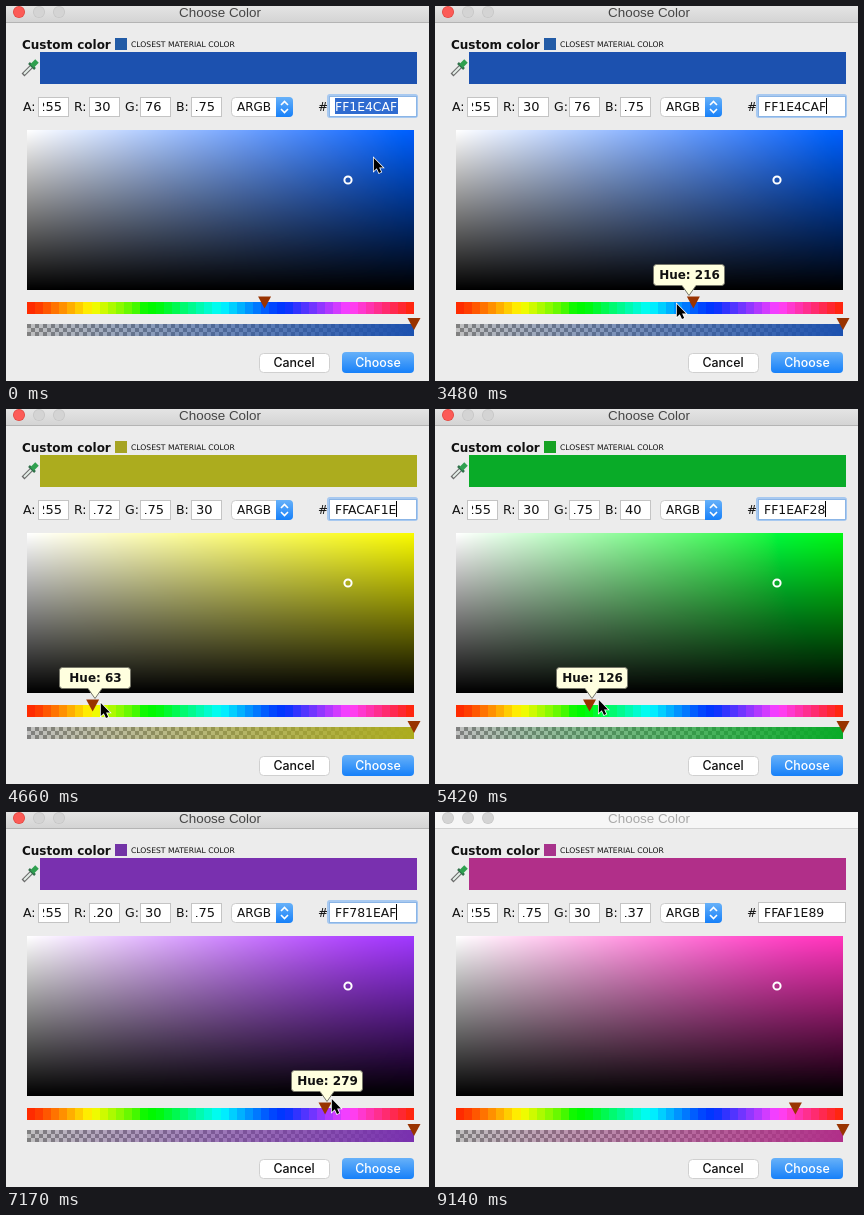
Recreate the animation shown at these times as an HTML page with a canvas. Size 423 by 375 pixels, loop 9240 ms.

```html
<!DOCTYPE html>
<html>
<head>
<meta charset="utf-8">
<style>
html, body { margin: 0; width: 423px; height: 375px; overflow: hidden; background: #ececec; }
canvas { display: block; }
</style>
</head>
<body>
<canvas id="stage" width="423" height="375"></canvas>
<script>
const ctx = document.getElementById('stage').getContext('2d');
const LOOP = 9240, DRAG = 3480, EXIT = 7960, BLUR = 9140;
const BAR_X = 21, BAR_W = 387, FIELD_H = 160;
const SANS = '"DejaVu Sans", sans-serif';

// Key points: [time, value...]
const hueStops = [[DRAG, 221], [3890, 139.9], [4600, 56], [5420, 124.1], [6280, 213.1], [7170, 277.2], [7760, 315.7]];
const approach = [[0, 367, 151], [540, 343, 169], [960, 343, 167], [1380, 410, 310], [1900, 268, 289], [3400, 259, 293]];
const leave = [[EXIT, 360, 286], [8300, 385, 355], [8560, 385, 355], [8720, 385, 376]];

const clamp = (x, lo, hi) => Math.min(hi, Math.max(lo, x));

function track(stops, t, i = 1) {
  const k = stops.findIndex(s => s[0] >= t);
  if (k === 0) return stops[0][i];
  if (k < 0) return stops[stops.length - 1][i];
  const a = stops[k - 1], b = stops[k];
  return a[i] + (b[i] - a[i]) * (t - a[0]) / (b[0] - a[0]);
}

const hueAt = t => track(hueStops, t);
const hueX = hue => BAR_X + BAR_W * hue / 360;

// While dragging, the pointer runs slightly ahead of the picked hue
function pointerAt(t) {
  if (t > 3400 && t < EXIT) return [hueX(hueAt(t + 80)), clamp(297 - (t - 3890) / 220, 286, 297)];
  const stops = t < EXIT ? approach : leave;
  return [track(stops, t, 1), track(stops, t, 2)];
}

// Display colour profile: linear light, channel mix, back to sRGB
const toLinear = Array.from({ length: 256 }, (_, i) => {
  const c = i / 255;
  return c <= 0.04045 ? c / 12.92 : ((c + 0.055) / 1.055) ** 2.4;
});
const toByte = Array.from({ length: 4097 }, (_, i) => {
  const c = i / 4096;
  return Math.round(255 * (c <= 0.0031308 ? c * 12.92 : 1.055 * c ** (1 / 2.4) - 0.055));
});
const encode = c => toByte[Math.round(clamp(c, 0, 1) * 4096)];

function shown(r, g, b) {
  const R = toLinear[r], G = toLinear[g], B = toLinear[b];
  return [encode(1.025 * R - 0.025 * G), encode(0.0194 * R + 0.9475 * G + 0.0331 * B), encode(B)];
}
const css = rgb => `rgb(${shown(...rgb)})`;

function hsv(h, s, v) {
  return [5, 3, 1].map(n => {
    const k = (n + h / 60) % 6;
    return Math.round(255 * v * (1 - s * clamp(Math.min(k, 4 - k), 0, 1)));
  });
}

function rect(x, y, w, h, fill) {
  ctx.fillStyle = fill;
  ctx.fillRect(x, y, w, h);
}

function text(str, x, y, font, fill = '#111', align = 'left') {
  ctx.font = font;
  ctx.fillStyle = fill;
  ctx.textAlign = align;
  ctx.fillText(str, x, y);
}

function path(points) {
  ctx.beginPath();
  points.forEach(p => ctx.lineTo(...p));
}

function stroke(color, width) {
  ctx.strokeStyle = color;
  ctx.lineWidth = width;
  ctx.stroke();
}

function line(points, color, width) {
  path(points);
  stroke(color, width);
}

function fill(color) {
  ctx.fillStyle = color;
  ctx.fill();
}

function disc(x, y, r, color) {
  ctx.beginPath();
  ctx.arc(x, y, r, 0, 7);
  fill(color);
}

function round(x, y, w, h, radius, color, border) {
  ctx.beginPath();
  ctx.roundRect(x, y, w, h, radius);
  fill(color);
  if (border) stroke(border, 1);
}

function fade(y0, y1, top, bottom) {
  const g = ctx.createLinearGradient(0, y0, 0, y1);
  g.addColorStop(0, top);
  g.addColorStop(1, bottom);
  return g;
}
const blueFade = (y0, y1) => fade(y0, y1, '#67b1f9', '#1680f9');

function titleBar(active) {
  rect(0, 0, 423, 16, active ? fade(0, 16, '#e4e4e4', '#d4d4d4') : '#f6f6f6');
  rect(0, 16, 423, 1, active ? '#b4b4b4' : '#d1d1d1');
  for (let i = 0; i < 3; i++) {
    const red = active && !i;
    disc(13 + 20 * i, 6, 6, red ? '#e2463f' : '#c6c6c6');
    disc(13 + 20 * i, 6, 5.2, red ? '#fc5b57' : '#d4d4d4');
  }
  text('Choose Color', 214, 11, '13.4px "Liberation Sans", sans-serif', active ? '#454545' : '#a8a8a8', 'center');
}

function dropper() {
  line([[17, 69], [26, 60]], '#6b6b6b', 4);
  line([[18, 68], [26, 60]], '#e4eee8', 2);
  line([[23, 57], [29, 63]], '#30704a', 2.5);
  line([[26, 60], [31, 55]], '#2fa04f', 5);
}

function channel(label, x, value) {
  text(label + ':', x - 16, 105, '12.5px ' + SANS);
  rect(x - 1, 91, 31, 20, '#c4c4c4');
  rect(x, 92, 29, 18, '#fff');
  ctx.save();
  ctx.beginPath();
  ctx.rect(x + 4, 92, 22, 18);
  ctx.clip();
  const wide = value > 99;
  text(value, wide ? x + 23 : x + 4, 105, '13px ' + SANS, '#111', wide ? 'right' : 'left');
  ctx.restore();
}

function combo() {
  round(225.5, 91.5, 61, 19, 4, '#fff', '#cbcbcb');
  round(270, 91, 17, 20, [0, 4, 4, 0], blueFade(91, 111));
  for (const dir of [-1, 1]) {
    const y = 101 + 2 * dir;
    line([[275, y], [278.5, y + 3.5 * dir], [282, y]], '#fff', 1.6);
  }
  text('ARGB', 231, 105, '12px ' + SANS);
}

function hexField(str, active, selected, caret) {
  text('#', 312, 105, '12px ' + SANS);
  if (active) round(321, 88, 91, 24, 3, '#a8c9f0');
  rect(323, 90, 88, 21, active ? '#8bb5e6' : '#c4c4c4');
  rect(324, 91, 86, 19, '#fff');
  if (selected) rect(329, 92, 63, 16, '#2f6bd0');
  text(str, 329, 105, '12.4px ' + SANS, selected ? '#fff' : '#111');
  if (caret) rect(329 + Math.floor(ctx.measureText(str).width), 92, 1, 16, '#000');
}

const shade = ctx.createImageData(BAR_W, FIELD_H);
let shadedHue;
function shadeField(hue) {
  if (hue !== shadedHue) {
    const pure = hsv(hue, 1, 1);
    for (let y = 0, p = 0; y < FIELD_H; y++) {
      const v = 1 - y / (FIELD_H - 1);
      for (let x = 0; x < BAR_W; x++, p += 4) {
        const s = x / (BAR_W - 1);
        const [r, g, b] = shown(...pure.map(c => Math.round(v * (255 - s * (255 - c)))));
        shade.data[p] = r;
        shade.data[p + 1] = g;
        shade.data[p + 2] = b;
        shade.data[p + 3] = 255;
      }
    }
    shadedHue = hue;
  }
  ctx.putImageData(shade, BAR_X, 124);
  ctx.beginPath();
  ctx.arc(342, 174, 3.6, 0, 7);
  stroke('#fff', 2);
}

function thumb(x, y) {
  path([[x - 6.5, y], [x + 6.5, y], [x, y + 12]]);
  fill('#993300');
}

function sliders(hue, rgb) {
  const cells = 48, edge = i => Math.round(BAR_X + i * BAR_W / cells);
  for (let i = 0; i < cells; i++)
    rect(edge(i), 296, edge(i + 1) - edge(i), 12, css(hsv((i + 0.5) * 360 / cells, 1, 1)));
  thumb(hueX(hue), 290.5);

  for (let y = 0; y < 12; y += 4)
    for (let x = 0; x < BAR_W; x += 4)
      rect(BAR_X + x, 318 + y, Math.min(4, BAR_W - x), 4, (x + y) % 8 ? '#c0c0c0' : '#808080');
  const c = shown(...rgb), g = ctx.createLinearGradient(BAR_X, 0, BAR_X + BAR_W, 0);
  g.addColorStop(0, `rgba(${c},0)`);
  g.addColorStop(1, `rgb(${c})`);
  rect(BAR_X, 318, BAR_W, 12, g);
  thumb(408, 312);
}

function buttons() {
  const font = '500 12.4px Inter, sans-serif';
  round(253.5, 347.5, 70, 19, 4, '#fff', '#d0d0d0');
  text('Cancel', 288, 361, font, '#111', 'center');
  round(336, 346, 72, 21, 4, blueFade(346, 367));
  text('Choose', 372, 361, font, '#fff', 'center');
}

function tooltip(hue) {
  const x = Math.round(hueX(hue)), left = x - 35.5, right = x + 35.5, top = 258.5, base = 279.5;
  ctx.beginPath();
  ctx.moveTo(x, 289.5);
  ctx.lineTo(x - 7, base);
  ctx.arcTo(left, base, left, top, 3);
  ctx.arcTo(left, top, right, top, 3);
  ctx.arcTo(right, top, right, base, 3);
  ctx.arcTo(right, base, x + 7, base, 3);
  ctx.lineTo(x + 7, base);
  ctx.closePath();
  fill('#ffffdf');
  stroke('#77776a', 1);
  text('Hue: ' + Math.round(hue), x + 0.5, 273, 'bold 12px ' + SANS, '#111', 'center');
}

function arrow(x, y) {
  ctx.save();
  ctx.translate(Math.round(x) + 0.8, Math.round(y) + 1);
  path([[0, 0], [0, 13], [3, 10.3], [5.2, 15], [7.4, 14], [5.3, 9.4], [9.2, 9.4]]);
  ctx.closePath();
  stroke('#fff', 1.5);
  fill('#000');
  ctx.restore();
}

function caretOn(t) {
  if (t >= DRAG && t < 8260) return true;
  return t < BLUR && Math.floor(t / 500) % 2 === 1;
}

function draw(t) {
  const active = t < BLUR;
  const hue = hueAt(t);
  const rgb = hsv(hue, 145 / 175, 175 / 255);
  const hex = 'FF' + rgb.map(c => c.toString(16).padStart(2, '0')).join('').toUpperCase();

  rect(0, 0, 423, 375, '#ececec');
  titleBar(active);
  text('Custom color', 16, 43, 'bold 12px ' + SANS);
  rect(109, 32, 12, 12, css(hsv(12 * Math.floor(hue / 12), 0.78, 0.65)));
  text('CLOSEST MATERIAL COLOR', 125, 41, '7.65px ' + SANS);
  dropper();
  rect(34, 46, 377, 32, css(rgb));

  [255, ...rgb].forEach((value, i) => channel('ARGB'[i], 33 + 51 * i, value));
  combo();
  hexField(hex, active, t < DRAG, caretOn(t));

  shadeField(hue);
  sliders(hue, rgb);
  buttons();
  if (t >= 1740 && t < 8060) tooltip(hueAt(t + 22));
  if (t < 8720) arrow(...pointerAt(t));
}

const start = performance.now();
function tick() {
  draw((performance.now() - start) % LOOP);
  requestAnimationFrame(tick);
}
tick();
</script>
</body>
</html>
```
